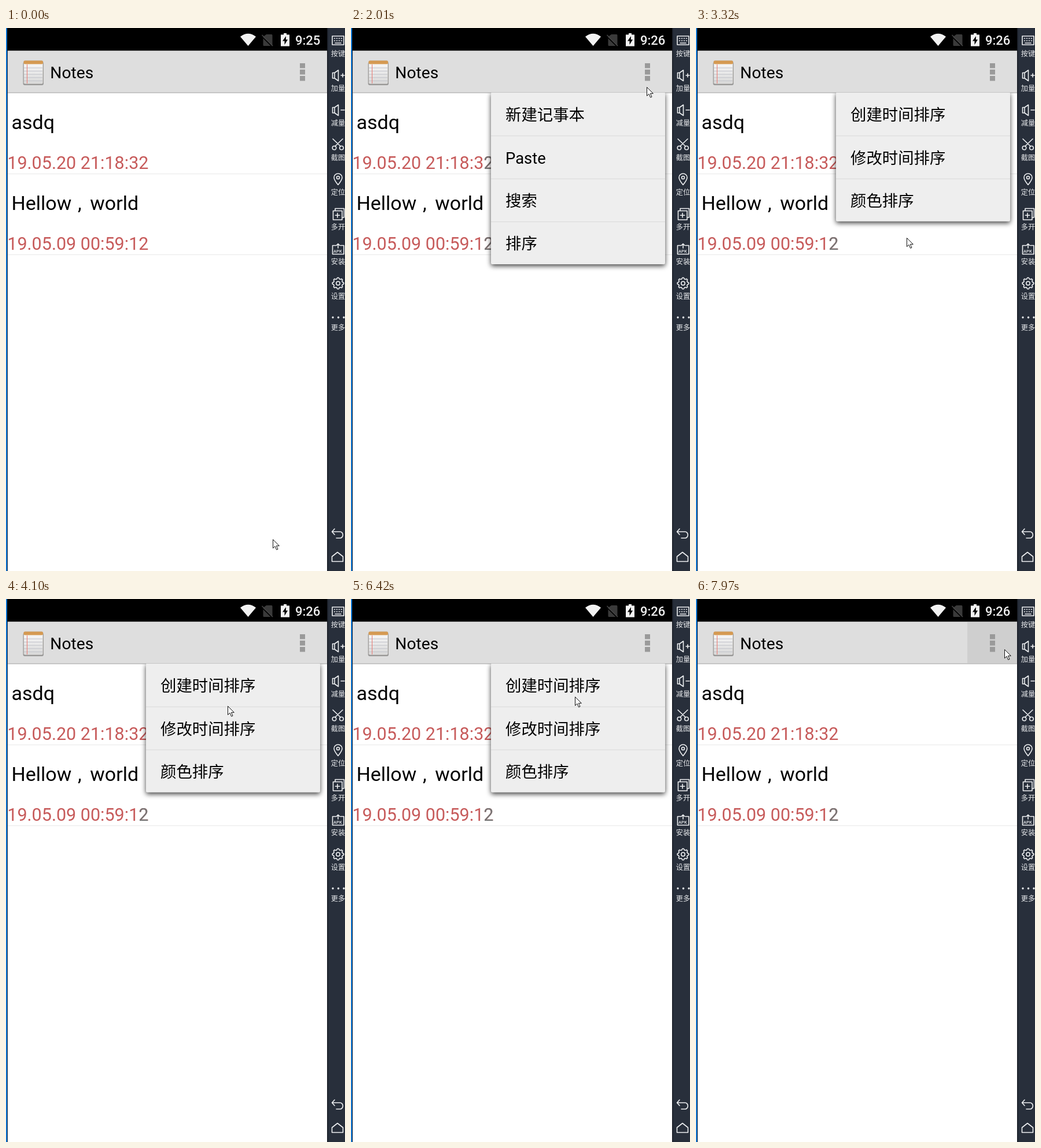
Write an HTML page that moves like this. It is 586x940 px and loops after 8 s.

```html
<!DOCTYPE html>
<html lang="zh-CN">
<head>
<meta charset="utf-8">
<title>Notes</title>
<style>
html, body { margin: 0; width: 100%; height: 100%; overflow: hidden; background: #fff; }
svg { display: block; }
text { font-family: Roboto, "Noto Sans CJK SC", sans-serif; white-space: pre; }
.title { font-size: 34px; }
.date { font-size: 30.5px; fill: #c75b5b; }
.tint { fill: #777; clip-path: url(#tail); }
.menu text { font-size: 27.4px; }
.panel { filter: drop-shadow(0 3px 4.5px rgba(0,0,0,.75)); }
.side path { fill: none; stroke: #eef0f2; stroke-width: 1.6; stroke-linejoin: round; stroke-linecap: round; }
.side text { font: 12.2px "Noto Sans CJK SC", sans-serif; fill: #e8eaec; }
.side .apk { font: 500 7.6px Roboto, sans-serif; }
</style>
</head>
<body>
<svg width="586" height="940">
  <defs>
    <clipPath id="below"><rect x="3" y="112" width="552" height="828"/></clipPath>
    <clipPath id="tail"><rect x="231" width="30" height="940"/></clipPath>
    <linearGradient id="paper" x2="0" y2="1"><stop stop-color="#fafafa"/><stop offset="1" stop-color="#d8d8d8"/></linearGradient>
  </defs>
  <rect width="3" height="940" fill="#232a36"/>
  <rect width="2" height="940" fill="#0f76d4"/>

  <!-- status bar: wifi, no card, battery, clock -->
  <rect x="2" width="553" height="39.5"/>
  <path d="M405 15Q418.5 4.500 432 15L418.5 31Z" fill="#f2f2f2"/>
  <path d="M450 11h9q1.500 0 1.500 1.500V31L444 15.500ZM444.500 18v11.500q0 1.500 1.500 1.500h11.500Z" fill="#3a3a3a"/>
  <path d="M442.500 12L461 31" stroke="#444" stroke-width="1.700"/>
  <path d="M480 9h5v2.500h5v20h-15v-20h5Z" fill="#f4f4f4"/>
  <path d="M484 14l-6 8.500h3.500V29l5.500-9h-3.200Z"/>
  <text id="clock" x="500" y="29" font-size="22" font-weight="500" fill="#f0f0f0"></text>

  <!-- action bar -->
  <rect x="3" y="39.500" width="552" height="73" fill="#dedede"/>
  <rect id="press" x="469" y="40" width="86" height="72" fill="#cfcfcf"/>
  <rect x="3" y="111" width="552" height="2" fill="#c6c6c6"/>
  <rect x="29.500" y="59" width="35.500" height="40" rx="3" fill="#949494"/>
  <rect x="30.500" y="57" width="33.500" height="40" rx="2.500" fill="url(#paper)" stroke="#a8a4a0" stroke-width=".8"/>
  <rect x="30.500" y="56.500" width="33.500" height="6" rx="2" fill="#d59a52"/>
  <path id="rules" stroke="#c0c2c9"/>
  <path d="M36.500 63v33" stroke="#ea7a72"/>
  <text x="76.300" y="87" font-size="28.200">Notes</text>
  <path d="M512.500 61v31" stroke="#9a9a9a" stroke-width="9" stroke-dasharray="8.500 2.500"/>

  <g id="list"></g>
  <g clip-path="url(#below)">
    <g id="main" class="menu"></g>
    <g id="sort" class="menu"></g>
  </g>

  <g class="side">
    <rect x="555" width="31" height="940" fill="#282f3b"/>
    <rect x="555" width="1.500" height="940" fill="#181c25"/>
    <g id="tools"></g>
    <text class="apk" x="566" y="389">APK</text>
    <path d="M568 867l-4.500 5 4.500 5M564 872h13.500a4.800 5.500 0 0 1 0 11H571"/>
    <path d="M563.500 915l9.500-7.500 9.500 7.500v8.500h-19Z"/>
  </g>
  <path id="cursor" d="M.5 .5v15l3.500-3.300 2.600 6 2.400-1-2.600-5.800h4.900Z" fill="#fff" stroke="#111"/>
</svg>
<script>
const $ = id => document.getElementById(id);
const LOOP = 8000, ROW = 74.4, TOP = 112;

// Notebook paper lines
$('rules').setAttribute('d', [0, 1, 2, 3, 4].map(i => `M31 ${69 + 5.6 * i}h32`).join(''));

const notes = [
  ['asdq', '19.05.20 21:18:32'],
  ['Hellow<tspan dx="12.8">,</tspan><tspan dx="14.6">world</tspan>', '19.05.09 00:59:12']
];
$('list').innerHTML = notes.map(([title, date], i) => `
  <g transform="translate(0 ${140 * i})">
    <text class="title" x="9.500" y="175">${title}</text>
    <text class="date" x="2.300" y="244">${date}</text>
    <text class="date tint" x="2.300" y="244">${date}</text>
    <path d="M3 252.500h552" stroke="#e8e8e8"/>
  </g>`).join('');
const tints = document.querySelectorAll('.tint');

function buildMenu(id, items, pressed) {
  const rows = items.map((item, i) => {
    const y = TOP + ROW * i;
    return (i ? `<path d="M242 ${y + 0.3}h301" stroke="#d9d9d9"/>` : '') +
      `<text x="267" y="${y + 48.2}">${item}</text>`;
  });
  $(id).innerHTML = `
    <rect class="panel" x="242" y="${TOP - 1}" width="301" height="${ROW * items.length + 0.5}" rx="2.5" fill="#eee"/>
    <rect class="hit" x="242" y="${TOP + ROW * pressed}" width="301" height="${ROW - 1}" fill="#dbdbdb"/>` + rows.join('');
}
buildMenu('main', ['新建记事本', 'Paste', '搜索', '排序'], 3);
buildMenu('sort', ['创建时间排序', '修改时间排序', '颜色排序'], 1);

const ring = (x, y, r) => `M${x - r} ${y}a${r} ${r} 0 1 0 ${2 * r} 0a${r} ${r} 0 1 0 ${-2 * r} 0`;
const keys = y => `M-6.5 ${y}` + 'h1m3 0'.repeat(4);
const speaker = 'M-6-4.5h-3.5v9.5h3.5l6.5 4.5v-18.5zv9.5M5 0h6';
const gear = 'M' + Array.from({ length: 64 }, (_, i) => {
  const a = i * Math.PI / 32, r = 8.8 + Math.max(-1, Math.min(1, 1.8 * Math.cos(8 * a)));
  return [r * Math.cos(a), r * Math.sin(a)].map(v => v.toFixed(1));
}).join('L') + 'Z';

// Icons drawn around their own centre
const tools = [
  ['按键', 'M-10-8h20v15h-20z' + keys(-4) + keys(0) + 'M-5 4h10'],
  ['加量', speaker + 'M8-3v6'],
  ['减量', speaker],
  ['截图', 'M-9-10L4.5 3M8-10L-5.5 3' + ring(-6.5, 5.5, 3.3) + ring(6, 5.5, 3.3)],
  ['定位', 'M0 9.5C-4.5 4-7 .5-7-3a7 7 0 0 1 14 0C7 .5 4.5 4 0 9.5z' + ring(0, -3, 2.5)],
  ['多开', 'M-5-6v-3.5h15.5v15.5h-3.5M-8.5-5.5h15.5v15.5h-15.5zM-1-1.5v7.5m-3.7-3.7h7.5'],
  ['安装', 'M-4-5.5h-5.5v15h19.5v-15h-5.5M0-1v-7.5m-3 3l3-3 3 3'],
  ['设置', gear + ring(0, 0, 3.2)],
  ['更多', [-9, 0.5, 10].map(x => ring(x, -1, 0.9)).join(''), 21]
];
$('tools').innerHTML = tools.map(([label, icon, gap = 27], i) => `
  <g transform="translate(574 ${22 + 60 * i})">
    <path d="${icon}"/><text x="-12.2" y="${gap}">${label}</text>
  </g>`).join('');

// Pointer moves: start, end, then the tip position reached
const home = [461, 885];
const moves = [
  [50, 450, 359, 430], [450, 830, 505, 99], [900, 1770, 508, 84], [1900, 2010, 511, 102],
  [2010, 2800, 364, 368], [3240, 4100, 383, 185], [4100, 4730, 387, 163], [5430, 5650, 387, 229],
  [5800, 6420, 387, 169], [6540, 6740, 375, 227], [7450, 7850, 536, 72], [7850, 7970, 533, 87]
];

const clamp = v => Math.max(0, Math.min(1, v));
const ease = k => k * k * (3 - 2 * k);

function pointer(t) {
  let [x, y] = home;
  for (const [from, to, nextX, nextY] of moves) {
    const k = ease(clamp((t - from) / (to - from)));
    x += (nextX - x) * k;
    y += (nextY - y) * k;
  }
  return [Math.round(x), Math.round(y)];
}

const show = (el, on) => { el.style.display = on ? '' : 'none'; };
const hit = id => $(id).querySelector('.hit');

function draw(t) {
  const inMain = t >= 2010 && t < 3240;
  const close = clamp((t - 6970) / 220);

  $('clock').textContent = t < 1500 ? '9:25' : '9:26';
  show($('press'), t >= 7900);
  show($('main'), inMain);
  show(hit('main'), t >= 2930);
  show($('sort'), t >= 3240 && close < 1);
  show(hit('sort'), t >= 6900);
  $('sort').setAttribute('opacity', 1 - close);
  $('sort').setAttribute('transform',
    `translate(392.5 ${TOP}) scale(${1 - 0.11 * close}) translate(-392.5 ${-TOP})`);
  show(tints[0], inMain);
  show(tints[1], t >= 2010);
  $('cursor').setAttribute('transform', `translate(${pointer(t)})`);
}

const start = performance.now();
function tick() {
  draw((performance.now() - start) % LOOP);
  requestAnimationFrame(tick);
}
tick();
</script>
</body>
</html>
```
